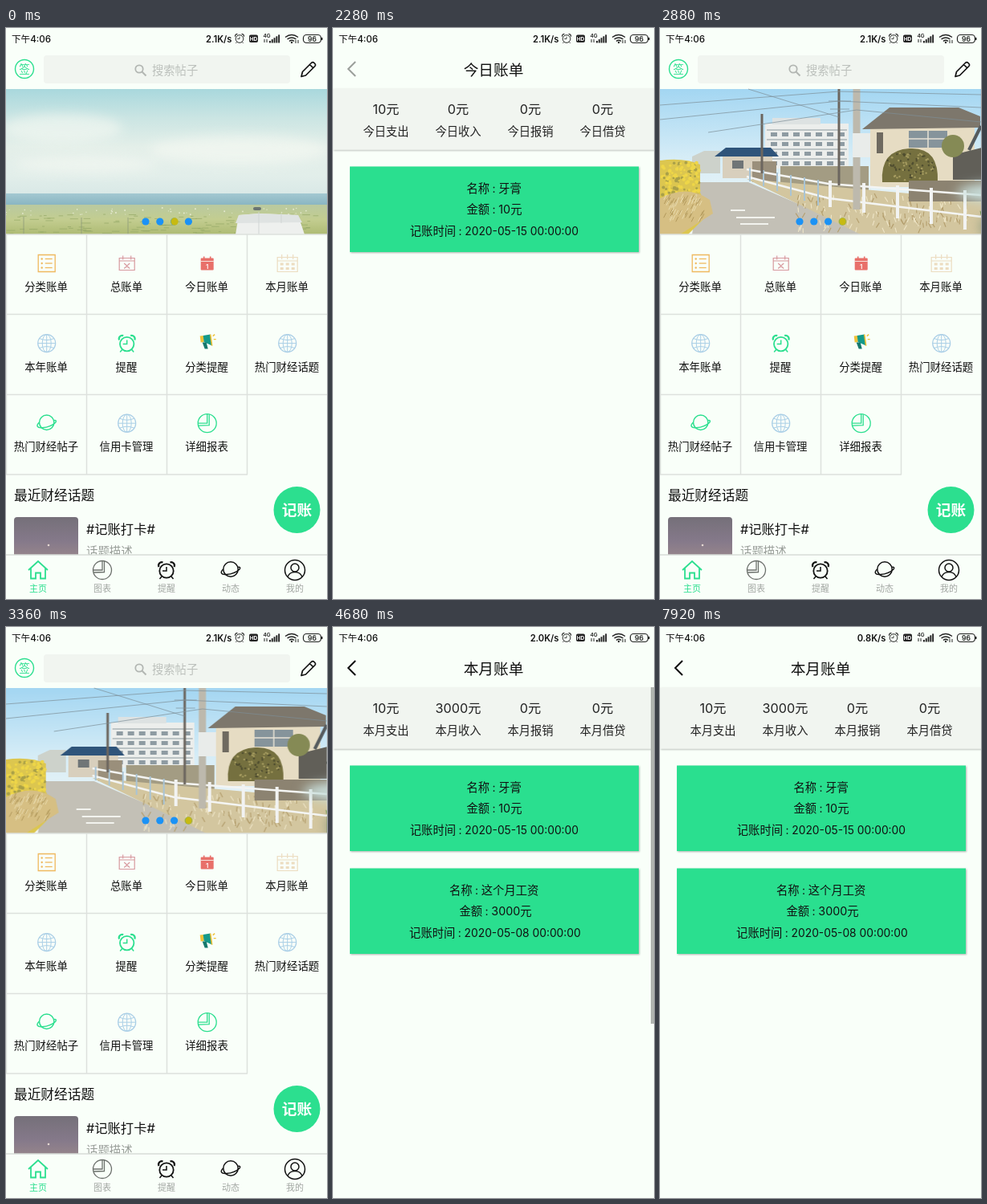
Animation, 400 px wide and 711 px high, one loop 8 s. Source, as an HTML page:

```html
<!DOCTYPE html>
<html lang="zh-CN">
<head>
<meta charset="utf-8">
<title>记账</title>
<style>
html, body { margin: 0; width: 100%; height: 100%; overflow: hidden; background: #f9fff9; }
svg { display: block; width: 100vw; height: 100vh; font-family: Inter, "Noto Sans CJK SC", "Noto Sans CJK", sans-serif; }
.anim { animation: 8s linear infinite; }
.step { animation-timing-function: step-end; }

#home { animation-name: home; }
#day { animation-name: day; }
#month { animation-name: month; }
#slides { animation-name: slides; }
#activeDot { animation-name: activeDot; }
#dayTap { animation-name: dayTap; }
#monthTap { animation-name: monthTap; }
#day .back { animation-name: backTap; }
#day .strip { animation-name: dayStrip; }
#month .strip { animation-name: monthStrip; }
#day .before { animation-name: dayBefore; }
#day .after { animation-name: dayAfter; }
#month .before { animation-name: monthBefore; }
#month .after { animation-name: monthAfter; }
#day .bar { animation-name: dayBar; }
#month .bar { animation-name: monthBar; }
#speed0 { animation-name: speed0; }
#speed1 { animation-name: speed1; }
#speed2 { animation-name: speed2; }

@keyframes home {
  0%, 33.75% { transform: none; }
  3%, 50.75% { transform: none; animation-timing-function: cubic-bezier(.215,.61,.355,1); }
  7.25%, 55%, 100% { transform: translateX(-100px); }
  30% { transform: translateX(-100px); animation-timing-function: ease-in-out; }
}
@keyframes day {
  0%, 33.75%, 100% { transform: translateX(400px); }
  3% { transform: translateX(400px); animation-timing-function: cubic-bezier(.215,.61,.355,1); }
  7.25% { transform: none; }
  30% { transform: none; animation-timing-function: ease-in-out; }
}
@keyframes month {
  0% { transform: translateX(400px); }
  50.75% { transform: translateX(400px); animation-timing-function: cubic-bezier(.215,.61,.355,1); }
  55%, 100% { transform: none; }
}
@keyframes slides {
  0% { transform: none; }
  8% { transform: none; animation-timing-function: ease; }
  14.25% { transform: translateX(-400px); }
  42% { transform: translateX(-400px); animation-timing-function: ease; }
  48.25%, 100% { transform: translateX(-800px); }
}
@keyframes activeDot {
  0% { transform: translateX(36px); }
  8% { transform: translateX(53.5px); }
  43% { transform: none; }
}
@keyframes dayTap { 0% { opacity: 0; } 1.5% { opacity: 1; } 6% { opacity: 0; } }
@keyframes monthTap { 0% { opacity: 0; } 48.5% { opacity: 1; } 55% { opacity: 0; } }
@keyframes backTap { 0% { stroke: #111; } 27% { stroke: #9b9f9b; } }
@keyframes dayStrip { 0%, 3% { opacity: 0; } 6% { opacity: .5; } 9%, 100% { opacity: 1; } }
@keyframes monthStrip { 0%, 50.75% { opacity: 0; } 53.75% { opacity: .5; } 56.75%, 100% { opacity: 1; } }
@keyframes dayBefore { 0% { opacity: 1; } 9% { opacity: 0; } }
@keyframes dayAfter { 0% { opacity: 0; } 9% { opacity: 1; } }
@keyframes monthBefore { 0% { opacity: 1; } 56.25% { opacity: 0; } }
@keyframes monthAfter { 0% { opacity: 0; } 56.25% { opacity: 1; } }
@keyframes dayBar { 0%, 7.4% { opacity: 0; } 7.5%, 18% { opacity: 1; } 21%, 100% { opacity: 0; } }
@keyframes monthBar { 0%, 56.9% { opacity: 0; } 57%, 70% { opacity: 1; } 73.5%, 100% { opacity: 0; } }
@keyframes speed0 { 0% { opacity: 1; } 45% { opacity: 0; } }
@keyframes speed1 { 0% { opacity: 0; } 45% { opacity: 1; } 96% { opacity: 0; } }
@keyframes speed2 { 0% { opacity: 0; } 96% { opacity: 1; } }
</style>
</head>
<body>
<svg id="stage" viewBox="0 0 400 711" xmlns="http://www.w3.org/2000/svg"></svg>
<script>
const BG = '#f9fff9', GREEN = '#2cdf8f', INK = '#111';

const text = (x, y, size, str, fill = INK, anchor = 'middle', extra = '') =>
  `<text x="${x}" y="${y}" font-size="${size}" fill="${fill}" text-anchor="${anchor}" ${extra}>${str}</text>`;
const rect = (x, y, w, h, fill, extra = '') =>
  `<rect x="${x}" y="${y}" width="${w}" height="${h}" fill="${fill}" ${extra}/>`;
const circle = (x, y, r, fill, extra = '') => `<circle cx="${x}" cy="${y}" r="${r}" fill="${fill}" ${extra}/>`;
const line = (d, stroke, width = 1, extra = '') =>
  `<path d="${d}" fill="none" stroke="${stroke}" stroke-width="${width}" ${extra}/>`;
const shape = (d, fill, extra = '') => `<path d="${d}" fill="${fill}" ${extra}/>`;
const at = (x, y, body, scale = 1) => `<g transform="translate(${x} ${y}) scale(${scale})">${body}</g>`;
const range = (n, f) => Array.from({ length: n }, (_, i) => f(i)).join('');
const gradient = (id, ...colors) => `<linearGradient id="${id}" x2="0" y2="1">` +
  colors.map((c, i) => `<stop offset="${i / (colors.length - 1)}" stop-color="${c}"/>`).join('') + '</linearGradient>';

let seed = 7;
const random = () => (seed = (seed * 16807) % 2147483647) / 2147483647;

// Icons, each centred on 0,0
const icon = {
  list: () => line('M-10.5-10.5h21v21h-21z', '#efb95f', 1.3) +
    range(3, i => circle(-6, -5.5 + i * 5.5, 1.2, '#efb95f') + line(`M-2 ${-5.5 + i * 5.5}h9`, '#efb95f', 1.3)),
  cross: () => line('M-9.5-6.5h19v15h-19zM-9.5-3h19M-5-9.5v5M5-9.5v5M-3.5 0l7 6.5M3.5 0l-7 6.5', '#d8999f', 1.2),
  today: () => rect(-8, -6.5, 16, 15, '#e8706a', 'rx="1"') + line('M-8-2.5h16', BG, .8) +
    line('M-4-8.5v4M4-8.5v4', '#e8706a', 1.6) + text(0, 6.5, 8, '1', '#fff', 'middle', 'font-weight="600"'),
  month: () => line('M-12.5-7.5h25v18h-25zM-12.5-3h25M-7-11v6M0-11v6M7-11v6', '#ecdcc0', 1.2) +
    line('M-9 1h18M-9 6.5h18', '#ecdcc0', 3, 'stroke-dasharray="4 3"'),
  globe: () => circle(0, 0, 11, 'none', 'stroke="#a9cee6" stroke-width="1.2"') +
    line('M-11 0h22M0-11v22M-9-6q9 4 18 0M-9 6q9-4 18 0', '#a9cee6', 1) +
    '<ellipse rx="5.5" ry="11" fill="none" stroke="#a9cee6"/>',
  alarm: c => circle(0, 1, 8.7, 'none', `stroke="${c}" stroke-width="1.8"`) +
    line('M0-4v5h-5M-6 8l-2.5 3M6 8l2.5 3', c, 1.5) +
    line('M-9.5-4a4 4 0 0 1 5-5.5M9.5-4a4 4 0 0 0-5-5.5', c, 2.2),
  horn: () => shape('M-9-9l5-.5v8l-4 .5z', '#f0c23a') + shape('M-5-9.500L4-11L6 3L-4-1.500z', '#159a8a') +
    shape('M-6-1h5l2 8h-4z', '#16786c') + line('M4-11L6 3', '#f0c23a', 1.6) + line('M8-5h3M7-9l2.500-2', '#f0c23a', 1.4),
  planet: c => circle(0, -1, 9.2, 'none', `stroke="${c}" stroke-width="1.5"`) +
    line('M-9.500-1c-4 4-2.500 7 4 6.500c6-.4 13-3 16.500-6.500c1.500-2 .5-3-2-2.500', c, 1.5),
  pie: c => circle(0, 0, 11.5, 'none', `stroke="${c}" stroke-width="1.3"`) +
    line('M0-11.500V0H-11.500M2.500-11V2.500L-11 3', c, 1.3),
  house: c => line('M-12 0L0-11L12 0M-9-2.500v13h6v-7h6v7h6v-13', c, 1.8),
  person: c => circle(0, 0, 12.5, 'none', `stroke="${c}" stroke-width="1.5"`) +
    circle(0, -3, 5, 'none', `stroke="${c}" stroke-width="1.5"`) + line('M-9 8.500q2-6 9-6t9 6', c, 1.5)
};

const seaPhoto = () => rect(0, 76, 401, 181, 'url(#seaSky)') +
  '<g fill="#f6f9f3" opacity=".6" filter="url(#soft)"><ellipse cx="70" cy="125" rx="75" ry="18"/><ellipse cx="290" cy="152" rx="110" ry="18"/><ellipse cx="100" cy="170" rx="90" ry="10"/></g>' +
  rect(0, 206, 401, 16, 'url(#sea)') + rect(0, 220, 401, 37, 'url(#meadow)') +
  range(45, () => circle(random() * 398, 224 + random() * 9, .5 + random() * .5, '#e6ead2')) +
  range(110, () => line(`M${random() * 385} ${232 + random() * 24}h${3 + random() * 9}`, '#94a866', .7)) +
  line('M22 235v22M94 236v21M152 236v21', '#8d9b7a', .8) +
  rect(308, 223, 10, 4, '#6a7472', 'rx="2"') +
  shape('M286 257l4-24l25-2l49 2l8 24z', '#eef0ee') + shape('M286 243l4-10l25-2l49 2l5 9z', '#dfe3e2') +
  line('M315 229v28M343 231v12', '#d0d5d4');

const hillPhoto = () => rect(0, 76, 401, 181, 'url(#hillSky)') +
  '<ellipse cx="60" cy="205" rx="90" ry="14" fill="#c9dfdc" filter="url(#soft)"/>' +
  line('M0 169L160 168', '#6f8581', 3) + line('M38 170v45M100 169v34M155 168v22', '#708581', 3) +
  line('M50 186l95-4', '#b5c6c0', 1) +
  shape('M0 236C50 204 110 199 160 188C250 184 330 172 400 143V257H0z', 'url(#grass)') +
  range(220, i => {
    const x = random() * 390, y = 222 - x * .16 + random() * 22 * (1 - x / 420);
    return line(`M${x} ${y}l${random() * 4 - 2}-5`, i % 3 ? '#b3cc72' : '#6d9450', 1);
  }) +
  shape('M400 150C310 180 200 196 60 257H400z', 'url(#road)') +
  shape('M0 238Q28 239 70 252L58 257H0z', '#5f7f6c', 'filter="url(#soft)" opacity=".6"');

const streetPhoto = () => rect(0, 76, 401, 181, 'url(#streetSky)') +
  rect(131, 119, 104, 56, '#eceeec') + rect(140, 112, 60, 8, '#dde2e2') +
  range(4, r => rect(133, 126 + r * 12, 100, 2, '#bcc4c5') +
    range(7, c => rect(138 + c * 14, 130 + r * 12, 8, 5, '#8e9ba2'))) +
  shape('M40 160l15-7h20v28H40z', '#cdd2cb') + rect(78, 160, 62, 27, '#d8cfbd') +
  shape('M68 160l14-11h56l10 11z', '#2f547a') + rect(90, 165, 14, 10, '#6f7577') + rect(115, 166, 30, 26, '#9a8f7b') +
  rect(262, 124, 130, 74, '#e6dcc3') + shape('M252 126l34-27h86l27 11v14z', '#7d776c') +
  rect(310, 128, 48, 21, '#86949b') + line('M310 138h48M334 128v21', '#e7e2d5', 1.5) +
  rect(270, 130, 8, 26, '#6f6a60') + shape('M365 158l36-9v40h-36z', '#615f58') +
  rect(150, 172, 110, 30, '#a39c83') +
  shape('M50 192H110L260 257H40z', '#c3c0b6') + shape('M108 188L400 214V257H250z', '#d3c69f') +
  range(150, i => {
    const x = 170 + random() * 215;
    return line(`M${x} ${212 + random() * 44}l${random() * 8 - 4}-6`, i % 2 ? '#b39d6c' : '#efe6c8', 1.1);
  }) +
  shape('M277 192q-3-40 34-42t35 42z', '#75703f') + circle(365, 147, 14, '#858a55') +
  range(80, i => {
    const a = random() * 6.3, d = Math.sqrt(random());
    return circle(311 + Math.cos(a) * d * 31, 172 + Math.sin(a) * d * 18, 1.2, i % 2 ? '#a69c60' : '#504e30');
  }) +
  rect(310, 190, 90, 26, '#8c8371') +
  shape('M0 165q30-4 50 5v35L62 230L35 257H0z', '#dcc64f') +
  range(110, i => circle(3 + random() * 46, 167 + random() * 42, 1 + random() * 1.5, i % 3 ? '#eed648' : '#a9a048')) +
  shape('M0 212q35-18 62 2l4 17L25 257H0z', '#d6bf83') +
  range(70, i => line(`M${4 + random() * 50} ${212 + random() * 30}l3-6`, i % 2 ? '#b39a5c' : '#eadcae', 1)) +
  line('M95 236h48M100 244h35M88 227h18', '#f2f3ee', 2) +
  line('M108 176L210 194L400 208M108 185L210 212L400 235', '#f4f5f3', 2.5) +
  range(6, i => line(`M${112 + i * 17} ${174 + i * 3}v${17 + i * 3}`, '#a9c4d4', 2)) +
  range(5, i => line(`M${212 + i * 42} ${190 + i * 3}v${33 + i * 4}`, '#f2f3f2', 4)) +
  line('M223 76v120M127 107v74', '#6c665f', 3) + line('M245 76v150', '#bdb9ad', 9) +
  rect(240, 131, 22, 30, '#e9ecea') + line('M385 152L400 122', '#555b5e', 4) +
  line('M0 96L223 79L400 83M0 114L223 91L400 99M60 130L245 102L400 117M110 76L223 111M210 91h28M212 101h24', '#7d8e97', .7);

const cells = [
  ['分类账单', 'list'], ['总账单', 'cross'], ['今日账单', 'today'], ['本月账单', 'month'],
  ['本年账单', 'globe'], ['提醒', 'alarm'], ['分类提醒', 'horn'], ['热门财经话题', 'globe'],
  ['热门财经帖子', 'planet'], ['信用卡管理', 'globe'], ['详细报表', 'pie']
];
const tabs = [
  ['主页', 'house', GREEN], ['图表', 'pie', '#6c706c'], ['提醒', 'alarm', INK], ['动态', 'planet', INK], ['我的', 'person', INK]
];

const homePage = () => `<g id="home" class="anim">` + rect(0, 0, 401, 711, BG) +
  circle(23, 51, 11.5, 'none', `stroke="${GREEN}" stroke-width="1.4"`) + text(23, 56, 13.5, '签', GREEN) +
  rect(47, 34, 307, 35, '#f1f5f0', 'rx="4"') +
  circle(166, 51, 4.7, 'none', 'stroke="#b2b6b2" stroke-width="1.8"') + line('M169.500 54.500l5 5', '#b2b6b2', 2) +
  text(182, 57.5, 14.3, '搜索帖子', '#bcc0bc', 'start') +
  line('M368 60.500l1.500-6L381 43q1.500-1 3 .5l1 1q1.300 1.500 0 3L373.500 59zM378.500 45.500l4.500 4.500', INK, 1.7, 'stroke-linejoin="round"') +
  `<g id="slides" class="anim">${seaPhoto()}${at(400, 0, streetPhoto())}${at(800, 0, hillPhoto())}</g>` +
  range(4, i => circle(174 + i * 17.8, 241, 4.6, '#1b92f5')) +
  circle(174, 241, 4.7, '#c7ba12', 'id="activeDot" class="anim step"') +
  rect(0, 257, 401, 300, BG) +
  rect(301, 258, 99, 98, '#e9eeea', 'id="monthTap" class="anim step"') +
  rect(201, 258, 99, 98, '#e9eeea', 'id="dayTap" class="anim step"') +
  line('M0 257H400M0 356.500H400M0 456.500H400M0 556H301M100.500 257V556M200.500 257V556M300.500 257V556M.5 257V556', '#dde1dd', 1.5) +
  cells.map(([label, name], i) => {
    const x = 50 + i % 4 * 100, y = 293 + (i >> 2) * 99.6;
    return at(x + .7, y, icon[name](GREEN)) + text(x, y + 34, 13.4, label);
  }).join('') +
  text(10, 588, 16.7, '最近财经话题', INK, 'start') +
  rect(10, 609, 80, 60, 'url(#thumb)', 'rx="4"') + circle(53, 644, 1.3, '#e4d8d2') +
  text(100, 630, 16.3, '#记账打卡#', INK, 'start') + text(100, 657, 14.4, '话题描述', '#999e99', 'start') +
  circle(362.5, 600, 29, GREEN) + text(362.5, 606.5, 18.7, '记账', '#fff', 'middle', 'font-weight="600"') +
  rect(0, 655.5, 401, 56, BG) + line('M0 656H400', '#c6cac6') +
  tabs.map(([label, name, color], i) => at(40 + i * 80, 675, icon[name](color)) +
    text(40 + i * 80, 702, 11, label, i ? '#a2a6a2' : GREEN)).join('') + '</g>';

const row = (y, label, value, x) => text(x, y, 14.3, label, INK, 'end') +
  text(x + 5.5, y, 14, ':') + text(x + 11.3, y, /^\d{4}-/.test(value) ? 13.8 : 14.3, value, INK, 'start');

const card = (y, name, amount, date, edges) =>
  rect(21, y, 360, 106.5, GREEN, 'filter="url(#shadow)"') +
  row(y + 32, '名称', name, edges[0]) + row(y + 58.5, '金额', amount, edges[1]) + row(y + 85.5, '记账时间', date, edges[2]);

const billPage = (id, period, totals, cards) => {
  const sums = (list, cls) => `<g class="anim step ${cls}">` +
    list.map((n, i) => text(66 + i * 90, 107, 16.2, n + '元', '#222')).join('') + '</g>';
  return `<g id="${id}" class="anim">` + rect(0, 0, 400, 711, BG) +
    line('M28 42L19 51L28 60', INK, 2, 'class="anim step back"') +
    text(200, 58.5, 18.7, period + '账单') +
    '<g class="anim strip">' + rect(0, 75.5, 400, 76, '#f1f5f0', 'filter="url(#shadow)"') +
    sums([0, 0, 0, 0], 'before') + sums(totals, 'after') +
    ['支出', '收入', '报销', '借贷'].map((kind, i) => text(66 + i * 90, 134, 14.3, period + kind, '#222')).join('') + '</g>' +
    cards.join('') + rect(396, 75, 4, 419, '#b0b4b0', 'class="anim bar"') + '</g>';
};

const toothpaste = card(172.5, '牙膏', '10元', '2020-05-15 00:00:00', [195, 195, 153]);
const salary = card(300.5, '这个月工资', '3000元', '2020-05-08 00:00:00', [173.5, 186, 152.3]);

const statusBar = () => '<g font-weight="600">' + text(7, 18, 11.6, '下午4:06', INK, 'start', 'font-weight="500"') +
  ['2.1', '2.0', '0.8'].map((n, i) => text(281.5, 17.5, 11.2, n + 'K/s', INK, 'end', `id="speed${i}" class="anim step"`)).join('') + '</g>' +
  at(291, 13, icon.alarm('#222'), .55) +
  rect(303, 8.5, 11, 9.5, '#222', 'rx="2"') + text(308.5, 16, 6.5, 'HD', '#fff', 'middle', 'font-weight="700"') +
  text(325, 12, 6.5, '4G', '#222', 'middle', 'font-weight="600"') + line('M322 14v4M325 14v4', '#222', 1) +
  range(5, i => rect(328 + i * 2.8, 16 - i * 1.9, 1.9, 2.5 + i * 1.9, '#222')) +
  line('M348 11.500q8-6 16 0M350.500 14q5.500-4 11 0M353 16.500q3-2.500 6 0', '#222', 1.5) + circle(356, 18, 1.2, '#222') +
  line('M361 15v4M364 15v4', '#222', 1) +
  rect(370.500, 8.500, 22, 10, 'none', 'rx="4" stroke="#222" stroke-width="1.2"') + rect(393, 12, 1.500, 3, '#222') +
  text(381.500, 16.800, 8.500, '96', '#222', 'middle', 'font-weight="600"');

const defs = '<defs>' +
  gradient('seaSky', '#a9d8dd', '#cbe5e3', '#e4efe9', '#e2eeea', '#d3e5e4', '#c8dfe0') +
  gradient('sea', '#a3c8d1', '#86b3c0') + gradient('meadow', '#b9c9a0', '#c3cd90', '#aebb74') +
  gradient('hillSky', '#b9e1ee', '#dcf0f3', '#f7fbf6', '#eff6ee') +
  gradient('grass', '#9db974', '#86a95a', '#5d8450') + gradient('road', '#d2d5c9', '#c8ccc0', '#bec1b4') +
  gradient('streetSky', '#a3d6f2', '#d9eef7', '#f3f7f4') + gradient('thumb', '#757079', '#85798a', '#a08c8c') +
  '<filter id="soft" x="-30%" y="-60%" width="160%" height="220%"><feGaussianBlur stdDeviation="7"/></filter>' +
  '<filter id="shadow" x="-5%" y="-5%" width="110%" height="115%"><feDropShadow dx="1" dy="1" stdDeviation="1" flood-color="#000" flood-opacity=".3"/></filter></defs>';

document.getElementById('stage').innerHTML = defs + homePage() +
  billPage('day', '今日', [10, 0, 0, 0], [toothpaste]) +
  billPage('month', '本月', [10, 3000, 0, 0], [toothpaste, salary]) + statusBar();
</script>
</body>
</html>
```
